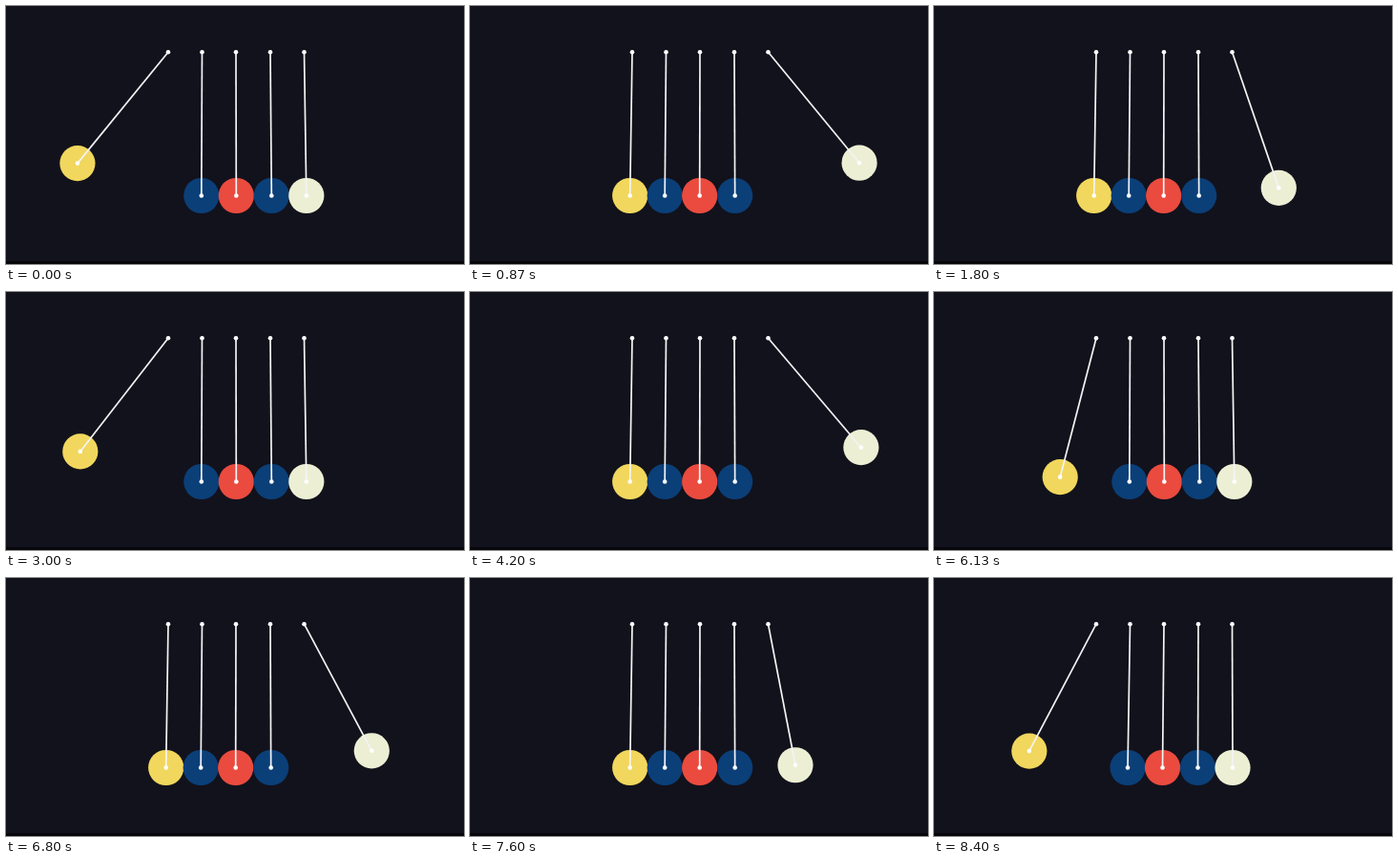
These frames come from a looping animation (480x270 px, 8.47 s). An HTML page with a canvas:

```html
<!DOCTYPE html>
<html lang="en">
<head>
<meta charset="utf-8">
<title>Newton's cradle</title>
<style>
  html, body { margin: 0; width: 100%; height: 100%; overflow: hidden; background: #12121c; }
  canvas { display: block; }
</style>
</head>
<body>
<canvas width="480" height="270"></canvas>
<script>
const ctx = document.querySelector('canvas').getContext('2d');
const LOOP = 8470, FPS = 15;
const ROD = 150.3, RADIUS = 18.6, PIVOT_Y = 48.2;
const PIVOTS = [170, 205.5, 241, 277, 312.5];
const COLORS = ['#f1d75d', '#0b3f78', '#ea4b3e', '#0b3f78', '#ecefd4'];
const REST = 0.76; // resting angle of the outer balls, in degrees

// Each swing peaks at a time (ms) with an angle (degrees); even swings are to the left.
const SWINGS = [
  [-306, 54], [1228, 53.2], [2705, 46.8], [4165, 40.5],
  [5600, 36.3], [7030, 32], [8475, 28.2]
];

function swingAt(time) {
  let next = SWINGS.findIndex(([peak]) => peak > time);
  const [start] = SWINGS[next - 1], [end] = SWINGS[next];
  const phase = (time - start) / (end - start);
  const index = phase < 0.5 ? next - 1 : next;
  return { index, lift: Math.abs(Math.cos(phase * Math.PI)) };
}

function disc(x, y, radius, color) {
  ctx.fillStyle = color;
  ctx.beginPath();
  ctx.arc(x, y, radius, 0, Math.PI * 2);
  ctx.fill();
}

function draw(time) {
  const { index, lift } = swingAt(time);
  const toLeft = index % 2 === 0;
  const outer = toLeft ? 0 : 4;
  const isLast = index === SWINGS.length - 1;
  const rowShift = isLast ? -1.5 * lift : toLeft ? 0.3 : -0.3;

  const balls = PIVOTS.map((pivot, i) => {
    let angle = Math.asin((i - 2 + rowShift) / ROD);
    if (i === outer) {
      const degrees = REST + (SWINGS[index][1] - REST) * lift;
      angle = (toLeft ? -degrees : degrees) * Math.PI / 180;
    }
    return { pivot, x: pivot + ROD * Math.sin(angle), y: PIVOT_Y + ROD * Math.cos(angle) };
  });

  ctx.fillStyle = '#12121c';
  ctx.fillRect(0, 0, 480, 270);
  ctx.fillStyle = '#07060b';
  ctx.fillRect(0, 267, 480, 3);

  balls.forEach(({ x, y }, i) => disc(x, y, RADIUS, COLORS[i]));
  ctx.strokeStyle = '#f4f4f6';
  ctx.lineWidth = 1.7;
  for (const { pivot, x, y } of balls) {
    ctx.beginPath();
    ctx.moveTo(pivot, PIVOT_Y);
    ctx.lineTo(x, y);
    ctx.stroke();
    disc(pivot, PIVOT_Y, 2.3, '#fff');
    disc(x, y, 2.3, '#fff');
  }
}

function tick() {
  const step = Math.floor(((performance.now() % LOOP) + 4) * FPS / 1000);
  draw(Math.max(step, 1) * 1000 / FPS);
  requestAnimationFrame(tick);
}
// The opening pose is held for two steps.
tick();
</script>
</body>
</html>
```
